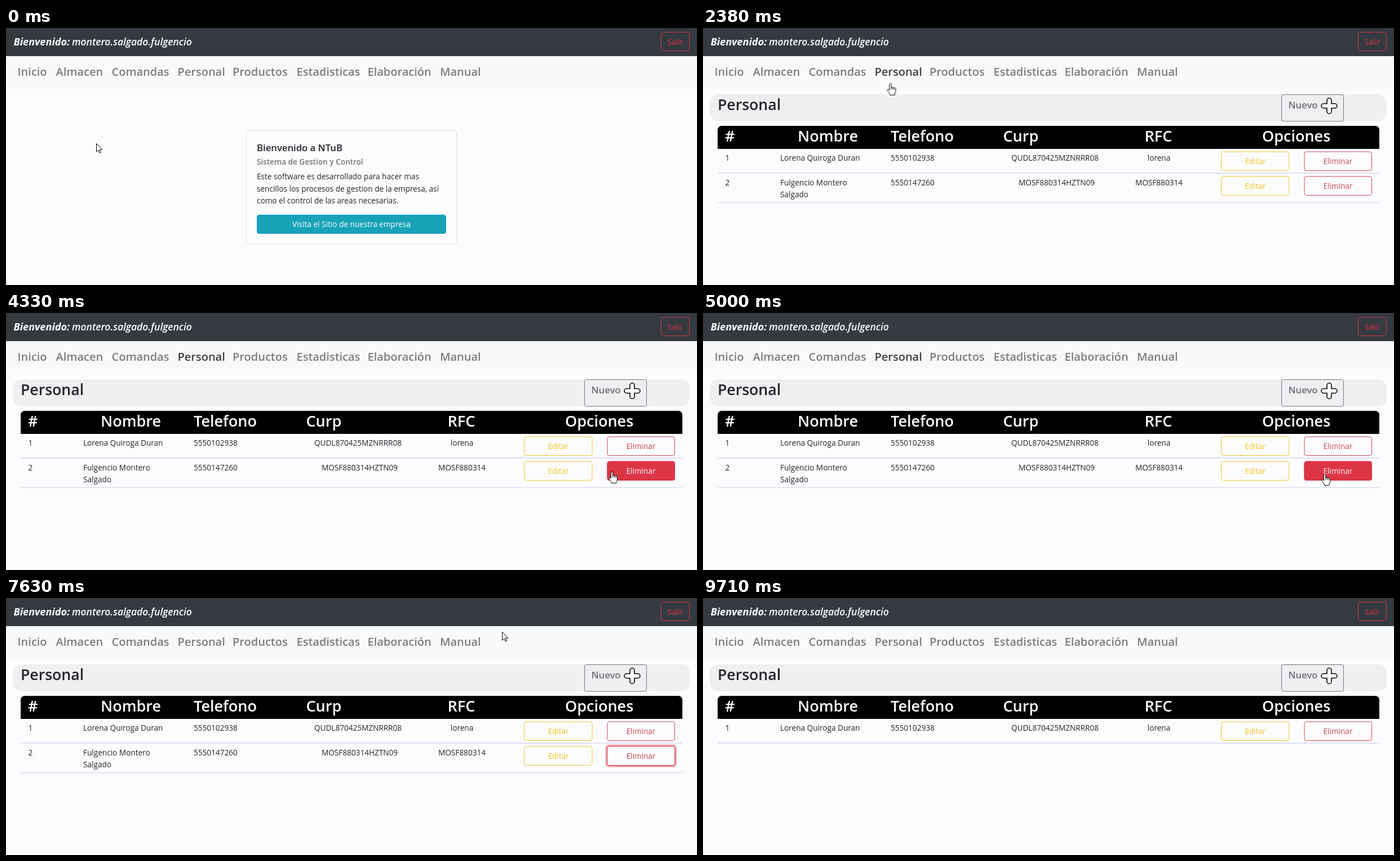
Write an HTML page that moves like this. It is 1226 px wide and 457 px high and loops after 9750 ms.

```html
<!DOCTYPE html>
<html lang="es">
<head>
<meta charset="utf-8">
<title>Personal</title>
<style>
  html, body { margin: 0; width: 100%; height: 100%; overflow: hidden; background: #fcfcfe; }
  svg { display: block; width: 1226px; height: 457px; }
  text { font: 13.6px "Open Sans", "Noto Sans", sans-serif; fill: #212529; }
  .mid, .btn text { text-anchor: middle; }
  .user text { font-size: 17.5px; font-weight: 600; font-style: italic; fill: #fff; }
  .user .hi { font-size: 18.1px; font-weight: 700; }
  .nav text { font-size: 20px; font-weight: 600; fill: #7b7c7d; }
  .title { font-size: 16.7px; font-weight: 600; }
  .sub { font-size: 13.6px; font-weight: 600; fill: #747678; }
  .big { font-size: 26.6px; font-weight: 600; }
  .head text { font-size: 27px; font-weight: 600; fill: #fff; }
  .rule { stroke: #dfe0f2; stroke-width: 2; }

  .btn rect { fill: none; stroke: currentColor; }
  .btn text { fill: currentColor; }
  .full rect { fill: currentColor; }
  .full text { fill: #fff; }
  .red { color: #dc3545; }
  .rowred { color: #c9474f; }
  .gold { color: #efc425; }
  .gold.full text { fill: #212529; }
  .teal { color: #17a2b8; }

  /* hard switches */
  .home, .staff, .second, .ring, .overEdit, .overDel, .hand, .arrow {
    animation: 9.75s step-end infinite;
  }
  .home { animation-name: home; }
  .staff { animation-name: staff; }
  .second { animation-name: second; }
  .ring { animation-name: ring; }
  .overEdit { animation-name: overEdit; }
  .overDel { animation-name: overDel; }
  .hand { animation-name: hand; }
  .arrow { animation-name: arrow; }
  .nav .current { animation: current 9.75s step-end infinite; }
  @keyframes home { 0% { opacity: 1 } 20.1%, 100% { opacity: 0 } }
  @keyframes staff { 0% { opacity: 0 } 21.1%, 100% { opacity: 1 } }
  @keyframes second { 0% { opacity: 1 } 84.1%, 100% { opacity: 0 } }
  @keyframes ring { 0% { opacity: 0 } 58.5% { opacity: 1 } 84.1%, 100% { opacity: 0 } }
  @keyframes overEdit { 0% { opacity: 0 } 41.7% { opacity: 1 } 43.5%, 100% { opacity: 0 } }
  @keyframes overDel { 0% { opacity: 0 } 44.2% { opacity: 1 } 69.1%, 100% { opacity: 0 } }
  @keyframes current { 0% { fill: #7b7c7d } 11.3% { fill: #3d3e3f } 58.5%, 100% { fill: #7b7c7d } }
  @keyframes hand {
    0%, 24.7%, 43.5% { opacity: 0 }
    11.3%, 41.7%, 44.2% { opacity: 1 }
    69.1%, 100% { opacity: 0 }
  }
  @keyframes arrow {
    0%, 24.7%, 43.5% { opacity: 1 }
    11.3%, 41.7%, 44.2% { opacity: 0 }
    69.1%, 100% { opacity: 1 }
  }

  .pointer { animation: travel 9.75s ease-in-out infinite; }
  .pointer path { fill: #fff; stroke: #000; stroke-linejoin: round; }
  @keyframes travel {
    0%, 2.5% { transform: translate(160px, 205px) }
    12.3%, 23.6% { transform: translate(327px, 97px) }
    30% { transform: translate(491px, 150px) }
    35.9% { transform: translate(491px, 150px); animation-timing-function: ease-in }
    41% { transform: translate(905px, 258px); animation-timing-function: ease-out }
    46% { transform: translate(1103px, 286px) }
    67.7% { transform: translate(1103px, 286px); animation-timing-function: ease-in }
    72% { transform: translate(905px, 182px); animation-timing-function: ease-out }
    78%, 83% { transform: translate(880px, 60px) }
    85.5%, 100% { transform: translate(880px, -30px) }
  }
</style>
</head>
<body>
<svg viewBox="0 0 1226 457">
  <rect width="1226" height="457" fill="#fcfcfe"/>
  <rect y="50" width="1226" height="59" fill="#f8f9fa"/>
  <rect width="1226" height="50" fill="#343a40"/>
  <g class="user">
    <text class="hi" x="13.5" y="31">Bienvenido:</text>
    <text x="117" y="31">montero.salgado.fulgencio</text>
  </g>
  <g class="btn red">
    <rect x="1162.5" y="7.5" width="50" height="33" rx="3.6"/>
    <text x="1187.5" y="30">Salir</text>
  </g>
  <g class="nav">
    <text x="20.5" y="85">Inicio</text>
    <text x="88.5" y="85">Almacen</text>
    <text x="187.5" y="85">Comandas</text>
    <text class="current" x="304.5" y="85">Personal</text>
    <text x="402" y="85">Productos</text>
    <text x="515.5" y="85">Estadisticas</text>
    <text x="641.5" y="85">Elaboración</text>
    <text x="770" y="85">Manual</text>
  </g>

  <g class="home">
    <rect x="426.5" y="182.5" width="373" height="202" rx="3.6" fill="#fcfcfe" stroke="#dedfdf"/>
    <text class="title" x="445" y="219">Bienvenido a NTuB</text>
    <text class="sub" x="445" y="243">Sistema de Gestion y Control</text>
    <text x="445" y="269">Este software es desarrollado para hacer mas</text>
    <text x="445" y="290.5">sencillos los procesos de gestion de la empresa, así</text>
    <text x="445" y="312">como el control de las areas necesarias.</text>
    <g class="btn full teal">
      <rect x="445.5" y="332.5" width="335" height="33" rx="3.6"/>
      <text x="613" y="354">Visita el Sitio de nuestra empresa</text>
    </g>
  </g>

  <g class="staff">
    <rect x="12" y="118" width="1201" height="48" rx="16" fill="#efeff1"/>
    <text class="big" x="26" y="146">Personal</text>
    <rect x="1026.5" y="118.5" width="110" height="47.5" rx="3.6" fill="none" stroke="#6c757d"/>
    <text class="title" x="1038.5" y="143" style="fill:#6c7075">Nuevo</text>
    <g fill="none" stroke-linecap="round">
      <path d="M1101 138.5h20M1111 128.5v20" stroke="#000" stroke-width="9.5"/>
      <path d="M1101 138.5h20M1111 128.5v20" stroke="#fff" stroke-width="6.3"/>
    </g>
    <path d="M26 215V181a7 7 0 0 1 7-7H1193a7 7 0 0 1 7 7V215z"/>
    <g class="head">
      <text x="39" y="202">#</text>
      <text x="168" y="202">Nombre</text>
      <text x="333" y="202">Telefono</text>
      <text x="532.5" y="202">Curp</text>
      <text x="783.5" y="202">RFC</text>
      <text x="992" y="202">Opciones</text>
    </g>

    <text x="39.5" y="235.5">1</text>
    <text x="137" y="235.5">Lorena Quiroga Duran</text>
    <text x="333" y="235.5">5550102938</text>
    <text class="mid" x="624.5" y="235.5">QUDL870425MZNRRR08</text>
    <text class="mid" x="809" y="235.5">lorena</text>
    <g class="btn gold">
      <rect x="919.5" y="220" width="120.5" height="33.5" rx="3.6"/>
      <text x="980" y="241.5">Editar</text>
    </g>
    <g class="btn rowred">
      <rect x="1067" y="220" width="119.5" height="33.5" rx="3.6"/>
      <text x="1126.5" y="241.5">Eliminar</text>
    </g>
    <path class="rule" d="M26 258H1200"/>

    <g class="second">
      <text x="39.5" y="279.5">2</text>
      <text x="137" y="279.5">Fulgencio Montero</text>
      <text x="137" y="301">Salgado</text>
      <text x="333" y="279.5">5550147260</text>
      <text class="mid" x="627.5" y="279.5">MOSF880314HZTN09</text>
      <text class="mid" x="809" y="279.5">MOSF880314</text>
      <g class="btn gold">
        <rect x="919.5" y="264" width="120.5" height="33.5" rx="3.6"/>
        <text x="980" y="285.5">Editar</text>
      </g>
      <g class="btn gold full overEdit">
        <rect x="919.5" y="264" width="120.5" height="33.5" rx="3.6"/>
        <text x="980" y="285.5">Editar</text>
      </g>
      <rect class="ring" x="1065.2" y="262.2" width="123.1" height="37.1" rx="5" fill="none" stroke="#eb959f" stroke-width="2.8"/>
      <g class="btn rowred">
        <rect x="1067" y="264" width="119.5" height="33.5" rx="3.6"/>
        <text x="1126.5" y="285.5">Eliminar</text>
      </g>
      <g class="btn red full overDel">
        <rect x="1067" y="264" width="119.5" height="33.5" rx="3.6"/>
        <text x="1126.5" y="285.5">Eliminar</text>
      </g>
      <path class="rule" d="M26 310.5H1200"/>
    </g>
  </g>

  <g class="pointer">
    <path class="arrow" d="M.5 .5v14.8l3.4-3.2 2.3 5.1 2.1-.9-2.3-5h4.8z"/>
    <g class="hand">
      <path d="M-1.5 12V1.8a1.6 1.6 0 0 1 3.2 0V7.5a1.4 1.4 0 0 1 2.8 .3a1.4 1.4 0 0 1 2.7 .6a1.3 1.3 0 0 1 2.4 .9v4.5c0 2-1.5 3.5-1.8 6.7h-8c-.5-3-3-5-5-8.3c-.8-1.8 1.4-2.7 2.4-1.4z"/>
      <path d="M1.7 7.5v3M4.5 7.8v3M7.2 8.4v2.6"/>
    </g>
  </g>
</svg>
</body>
</html>
```
